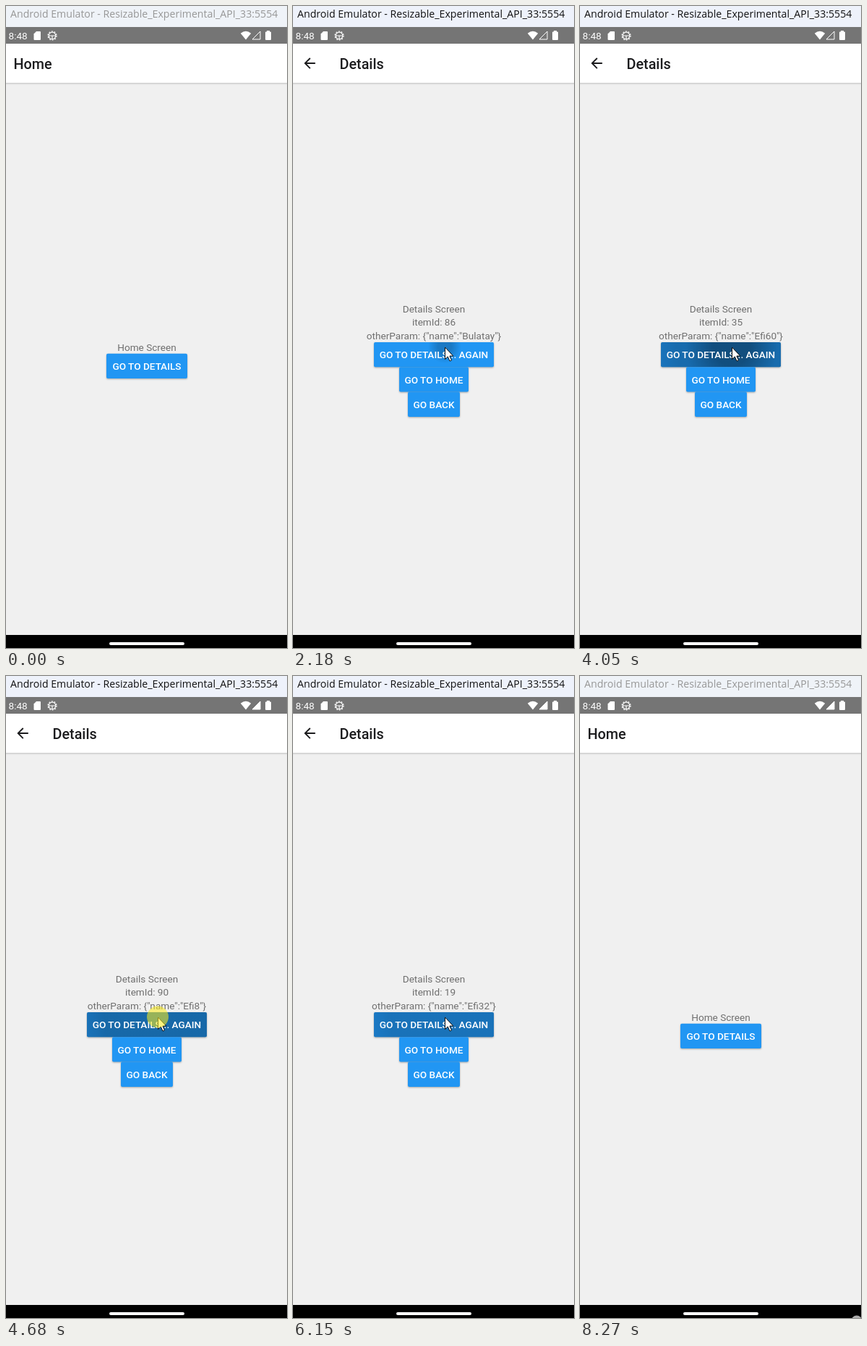
Write an HTML page that moves like this. It is 389x886 px and loops after 8340 ms.

```html
<!DOCTYPE html>
<html lang="en">
<head>
<meta charset="utf-8">
<title>Navigation demo</title>
<style>
  html, body { margin: 0; width: 100%; height: 100%; overflow: hidden; background: #f0f0f0; }
  svg { display: block; font: 13.6px Roboto, sans-serif; }
  text { white-space: pre; }
  .mid { text-anchor: middle; fill: #6f6f6f; }
  .head { font-size: 19.8px; font-weight: 500; fill: #1c1c1e; }
  .label { font-size: 13.6px; font-weight: 500; fill: #fff; text-anchor: middle; }
  .btn { fill: #2196f3; filter: drop-shadow(0 1.5px 1px rgba(0, 0, 0, .3)); }
  #title { font: 14.15px "Open Sans", "Noto Sans", sans-serif; }
</style>
</head>
<body>
<svg width="389" height="886" viewBox="0 0 389 886">
  <defs>
    <clipPath id="view"><rect y="52" width="389" height="816"/></clipPath>
    <clipPath id="homeClip"><rect x="139" y="479.7" width="112" height="34.3" rx="2"/></clipPath>
    <clipPath id="againClip"><rect x="112" y="464" width="166" height="34.3" rx="2"/></clipPath>
    <radialGradient id="soft">
      <stop offset=".4"/>
      <stop offset="1" stop-opacity="0"/>
    </radialGradient>
    <linearGradient id="drop" x2="0" y2="1">
      <stop stop-opacity=".16"/>
      <stop offset="1" stop-opacity="0"/>
    </linearGradient>
    <g id="card">
      <rect y="52" width="389" height="816" fill="#f0f0f0"/>
      <rect y="106" width="389" height="3" fill="url(#drop)"/>
      <rect y="52" width="389" height="54" fill="#fff"/>
    </g>
  </defs>

  <rect width="389" height="886" fill="#f0f0f0"/>
  <g clip-path="url(#view)">
    <g id="home">
      <use href="#card"/>
      <text class="head" x="10.4" y="87">Home</text>
      <text class="mid" x="195" y="476">Home Screen</text>
      <rect class="btn" x="139" y="479.7" width="112" height="34.3" rx="2"/>
      <g id="homeInk" clip-path="url(#homeClip)"></g>
      <text class="label" x="195" y="502">GO TO DETAILS</text>
    </g>
    <g id="details">
      <use href="#card"/>
      <circle id="backInk" cx="27" cy="72" opacity=".13"/>
      <path transform="translate(11.5 67.5) scale(.964)" fill="#1c1c1e" d="M20 11H7.83l5.59-5.59L12 4l-8 8 8 8 1.41-1.41L7.83 13H20z"/>
      <text class="head" x="64.5" y="87">Details</text>
      <text class="mid" x="195" y="423">Details Screen</text>
      <text class="mid" x="195" y="441" id="item"></text>
      <text class="mid" x="195" y="460" id="param"></text>
      <rect class="btn" x="112" y="464" width="166" height="34.3" rx="2"/>
      <g id="againInk" clip-path="url(#againClip)"></g>
      <rect class="btn" x="147" y="498.3" width="96" height="34.3" rx="2"/>
      <rect class="btn" x="159" y="532.6" width="72" height="34.3" rx="2"/>
      <text class="label" x="195" y="486">GO TO DETAILS... AGAIN</text>
      <text class="label" x="195" y="521">GO TO HOME</text>
      <text class="label" x="195" y="555">GO BACK</text>
    </g>
  </g>

  <rect id="bar" width="389" height="29"/>
  <text id="title" x="6" y="16">Android Emulator - Resizable_Experimental_API_33:5554</text>
  <rect y="29" width="389" height="23" fill="#757575"/>
  <g fill="#fff">
    <text x="3.5" y="46">8:48</text>
    <path d="M42 35H47Q48 35 48 36V46Q48 47 47 47H39.500Q38.500 47 38.500 46V38.500Z"/>
    <path d="M332 46.500L324.800 37.800Q332 31.500 339.200 37.800Z"/>
    <path id="signal" d="M352 35V46H341Z" stroke="#fff"/>
    <path d="M361 35.500V34H365V35.500H366Q367 35.500 367 36.500V46Q367 47 366 47H360Q359 47 359 46V36.500Q359 35.500 360 35.500Z"/>
  </g>
  <g fill="none" stroke="#fff" stroke-width="1.2">
    <circle cx="64" cy="41" r="4.800"/>
    <circle cx="64" cy="41" r="6" stroke-dasharray="2 1.770"/>
    <path d="M59.500 41H68.500M64 41V46"/>
  </g>
  <rect y="868" width="389" height="18"/>
  <rect x="143" y="878" width="104" height="4" rx="2" fill="#fff"/>
  <circle id="corner" cx="383" cy="890" r="7.500" fill="#aaa"/>

  <path id="cursor" fill="#fff" stroke="#111" d="M.5.5V17L4.300 13.400 7 19.500 9.500 18.400 6.900 12.500H11.800Z"/>
  <circle id="tap" r="15" fill="rgb(250,235,30)" opacity=".57"/>
</svg>
<script>
const LOOP = 8340, HOLD = 140;
const $ = id => document.getElementById(id);
const clamp = v => Math.min(1, Math.max(0, v));
const easeOut = v => 1 - (1 - clamp(v)) ** 3;
const set = (el, attrs) => { for (const k in attrs) el.setAttribute(k, attrs[k]); };
const show = (el, on) => el.style.display = on ? '' : 'none';

// Pointer path: time, x, y
const path = [
  [280, 302, 539], [560, 191, 501], [1150, 191, 501], [1430, 206, 549],
  [1740, 206, 549], [2040, 210, 470.5], [6200, 210, 470.5], [6430, 158, 309],
  [6640, 80, 205], [6850, 60, 115], [7110, 29, 67.5], [LOOP, 29, 67.5]
];

// Presses on the "again" button: time, new id, new name
const again = [
  [2040, 52, 'Efi38'], [2420, 17, 'Efi91'], [2750, 74, 'Efi14'], [3060, 68, 'Efi25'],
  [3560, 35, 'Efi60'], [3870, 43, 'Efi72'], [4230, 90, 'Efi8'], [4590, 26, 'Efi53'],
  [4960, 31, 'Efi47'], [5300, 58, 'Efi84'], [5600, 19, 'Efi32']
];
const presses = [820, ...again.map(a => a[0]), 7180];

function ripple(parent, press, x, y) {
  const el = document.createElementNS('http://www.w3.org/2000/svg', 'circle');
  set(el, { cx: x, cy: y, fill: 'url(#soft)' });
  $(parent).append(el);
  return { el, start: press + HOLD };
}
const ripples = [
  ripple('homeInk', 820, 191, 501),
  ...again.map(a => ripple('againInk', a[0], 210, 470))
];

function pointer(t) {
  let i = 1;
  while (i < path.length - 1 && path[i][0] < t) i++;
  const [t0, x0, y0] = path[i - 1], [t1, x1, y1] = path[i];
  const p = clamp((t - t0) / (t1 - t0));
  return [x0 + (x1 - x0) * p, y0 + (y1 - y0) * p];
}

function zoom(el, s) {
  set(el, { transform: `translate(195 460) scale(${s}) translate(-195 -460)` });
}

function draw(t) {
  const focused = t >= 820 && t < 8270;
  set($('bar'), { fill: focused ? '#eef2fb' : '#eff3f8' });
  set($('title'), { fill: focused ? '#111' : '#979797' });
  set($('signal'), { 'fill-opacity': t < 4400 ? 0 : 1 });
  show($('corner'), t >= 8270);

  // Screen change: the new card grows in over the old one, and back
  const open = easeOut((t - 1090) / 400) - easeOut((t - 7340) / 390);
  const alpha = clamp((t - 1140) / 100) - clamp((t - 7375) / 100);
  zoom($('home'), 1 + .15 * open);
  zoom($('details'), .85 + .15 * open);
  set($('details'), { opacity: alpha });
  show($('details'), alpha > 0);

  const [, id, name] = again.findLast(a => t >= a[0] + HOLD + 70) || [0, 86, 'Bulatay'];
  $('item').textContent = `itemId: ${id}`;
  $('param').textContent = `otherParam: {"name":"${name}"}`;

  for (const { el, start } of ripples) {
    const age = t - start;
    show(el, age >= 0 && age < 700);
    set(el, {
      r: 22 + 170 * easeOut(age / 450),
      opacity: .29 * clamp((age + 100) / 150) * clamp((700 - age) / 350)
    });
  }
  show($('backInk'), t >= 7320);
  set($('backInk'), { r: 5 + 14 * clamp((t - 7320) / 200) });

  const [x, y] = pointer(t);
  show($('cursor'), t >= 280 && t < 8270);
  set($('cursor'), { transform: `translate(${x} ${y})` });
  show($('tap'), presses.some(p => t >= p && t < p + HOLD));
  set($('tap'), { cx: x, cy: y });
}

const begin = performance.now();
function tick() {
  draw((performance.now() - begin) % LOOP);
  requestAnimationFrame(tick);
}
tick();
</script>
</body>
</html>
```
